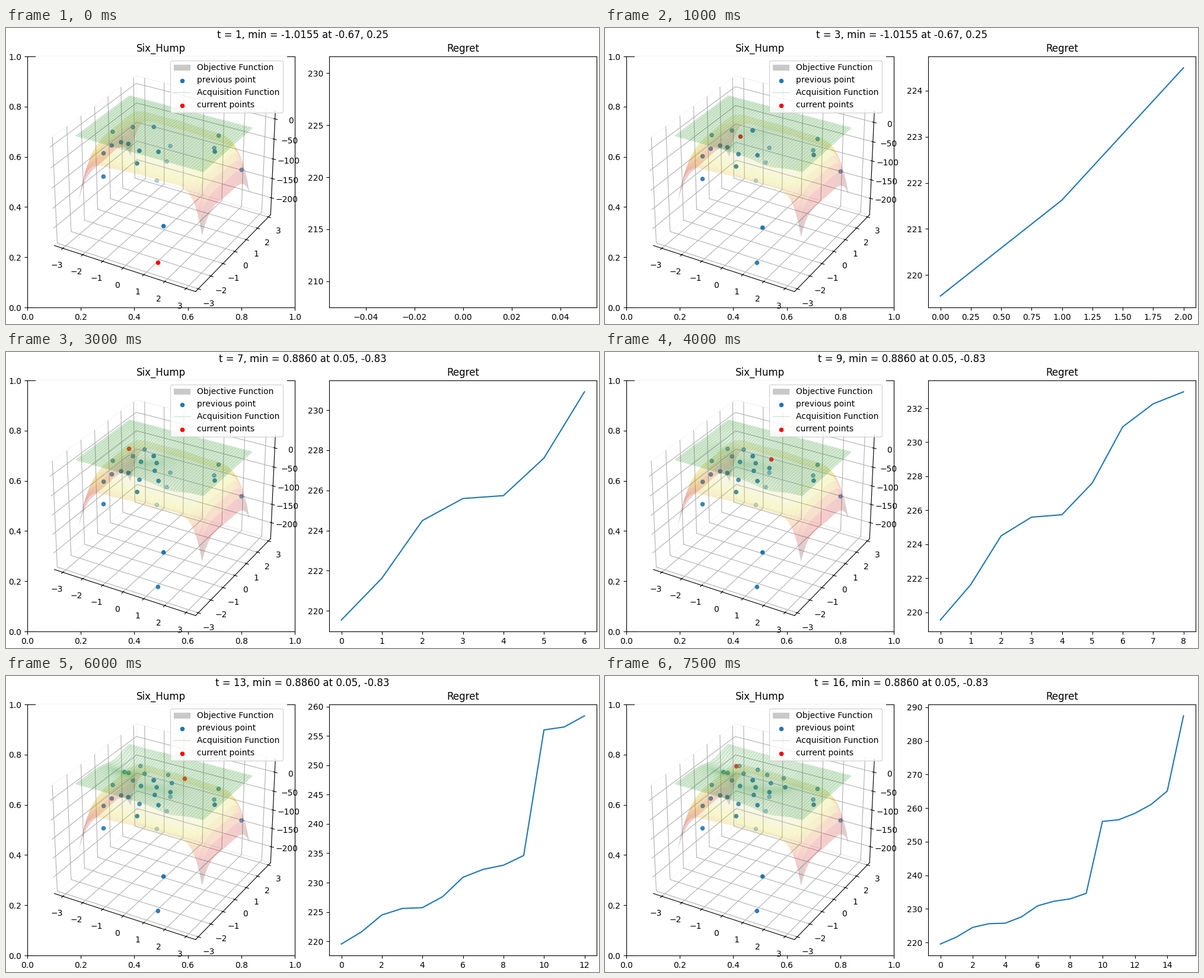
Recreate the animation shown at these times as a matplotlib script. Size 1000x500 px, loop 8000 ms.

```python
import numpy as np
import matplotlib.pyplot as plt
from matplotlib.animation import FuncAnimation
from matplotlib.colors import ListedColormap
from matplotlib.lines import Line2D
from matplotlib.patches import Patch

plt.rcParams["font.family"] = "DejaVu Sans"

STEPS, STEP_MS = 16, 500
X_HALF, Y_HALF, Z_LOW = 3.4375, 3.21, -244.6
BEST_VALUE = 1.0316

# (x, y) of the samples known at the start, then of the one chosen at each step
START = [(-2.01, -0.8), (-1.45, -0.14), (-0.67, 0.25), (1.98, 1.02), (-1.61, -1.48),
         (-1.29, -1.27), (-0.94, -1.27), (-1.84, -1.74), (-0.29, -1.45), (0.52, -1.3),
         (-1.19, 2.41), (1.125, 2.195), (2.35, 0.06), (-0.18, -1.8), (-1.51, 2.63),
         (-2.155, 2.838), (-1.59, -2.15), (2.4, 2.33), (1.52, -2.526)]
CHOSEN = [(1.435, -2.8175), (-0.676, 0.237), (-0.889, -0.395), (-0.234, -0.229),
          (0.05, -0.83), (-1.309, 0.538), (-1.959, 0.32), (0.471, -0.3),
          (0.137, 0.357), (-1.82, 1.018), (-2.487, 0.804), (-0.36, 0.881),
          (0.371, 0.998), (0.81, 0.388), (-1.001, 1.162), (-2.324, 1.518)]


def camel(x, y):
    """Negated six-hump camel function."""
    return -((4 - 2.1 * x**2 + x**4 / 3) * x**2 + x * y + (4 * y**2 - 4) * y**2)


def z_high(t):
    return 34 - 14.8 * np.exp(-(t - 1) / 2)


def acquisition(x, y, t):
    """Flat sheet that sinks around every sample already tried."""
    top = z_high(t)
    sheet = np.full_like(x, top - 0.0636 * (top - Z_LOW))
    for (cx, cy), loss in zip(CHOSEN[:t - 1], losses):
        sheet -= 5 * np.log1p(loss) * np.exp(-((x - cx)**2 + (y - cy)**2) / 0.6)
    return sheet


sx, sy = np.array(START + CHOSEN).T
samples = np.array([sx, sy, camel(sx, sy)])
losses = BEST_VALUE - samples[2, len(START):]
regret = np.cumsum(losses)
gx, gy = np.meshgrid(np.linspace(-3, 3, 50), np.linspace(-2, 2, 50))

fig = plt.figure(figsize=(10, 5), dpi=100)
left_rect = [0.036, 0.056, 0.451, 0.848]
left = fig.add_axes(left_rect)
left.set(xlim=(0, 1), ylim=(0, 1))
left.set_title("Six_Hump")
right = fig.add_axes([0.545, 0.056, 0.451, 0.848])
title = fig.suptitle("", y=0.9935)

ax = fig.add_axes(left_rect, projection="3d", computed_zorder=False)
for axis in (ax.xaxis, ax.yaxis, ax.zaxis):
    axis.pane.set_fill(False)
dim_hot = ListedColormap(plt.cm.hot(np.linspace(0, 1, 256)) * [0.85, 0.85, 0.85, 1])
ax.plot_surface(gx, gy, camel(gx, gy), cmap=dim_hot, alpha=0.2, zorder=2)

wire_style = dict(color="green", alpha=0.135, linewidth=1.4)
ax.legend([Patch(facecolor=(0, 0, 0, 0.21), linewidth=0),
           left.scatter([], [], s=20, c="C0"),
           Line2D([], [], **wire_style),
           left.scatter([], [], s=20, c="red")],
          ["Objective Function", "previous point", "Acquisition Function", "current points"],
          loc="upper right")

shown = []


def show(i):
    t = i + 1
    while shown:
        shown.pop().remove()
    n = len(START) + i
    shown.append(ax.scatter(*samples[:, :n], c="C0", zorder=1))
    shown.append(ax.scatter(*samples[:, n:n + 1], c="red", zorder=1.5))
    shown.append(ax.plot_wireframe(gx, gy, acquisition(gx, gy, t), rcount=50, ccount=50,
                                   zorder=3, **wire_style))
    ax.set(xlim=(-X_HALF, X_HALF), ylim=(-Y_HALF, Y_HALF), zlim=(Z_LOW, z_high(t)))

    right.clear()
    right.set_title("Regret")
    right.plot(np.arange(t), regret[:t], color="C0")

    best = "0.8860 at 0.05, -0.83" if t >= 5 else "-1.0155 at -0.67, 0.25"
    title.set_text(f"t = {t}, min = {best}")


anim = FuncAnimation(fig, show, frames=STEPS, init_func=lambda: show(0),
                     interval=STEP_MS, repeat=True, repeat_delay=0)
plt.show()
```
